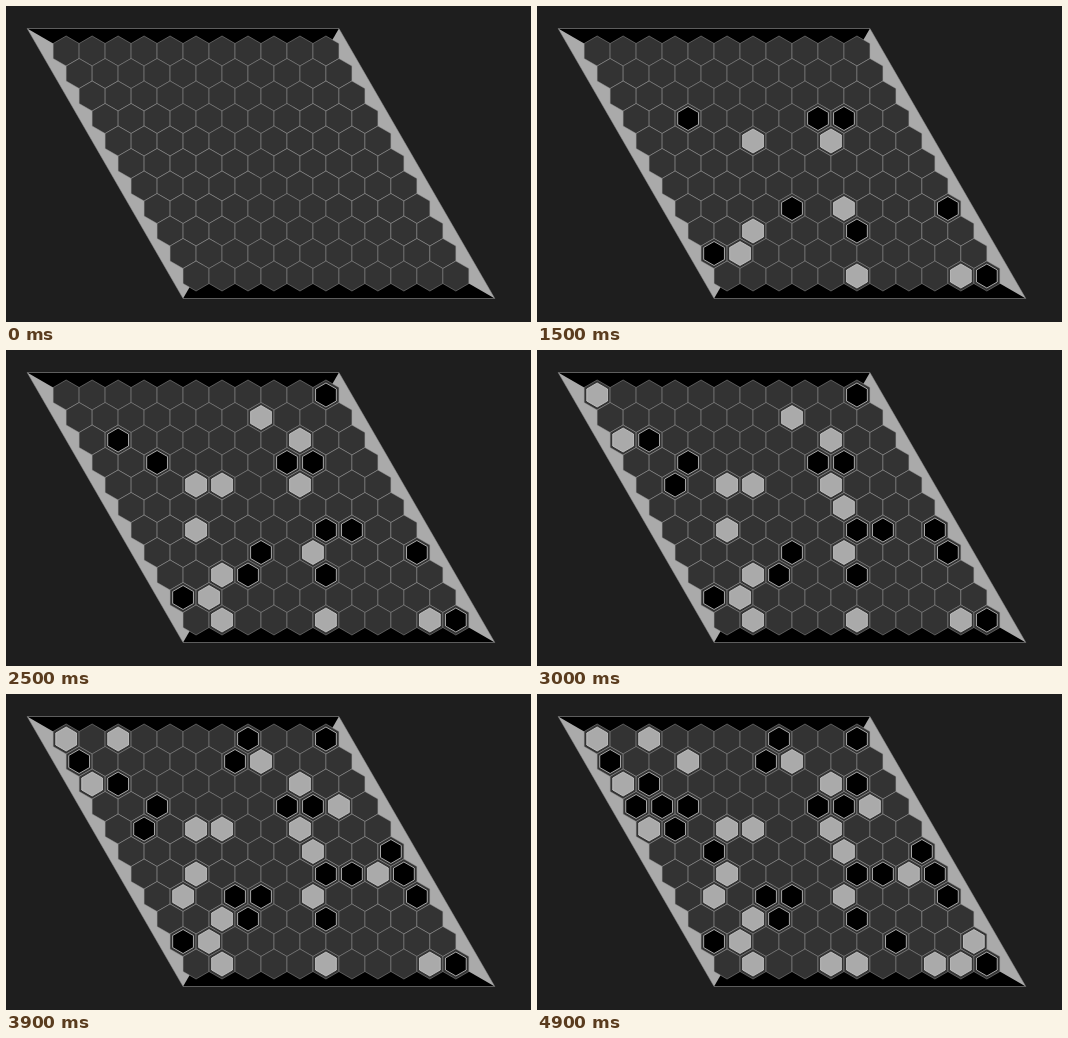
An HTML page with a canvas that plays this animation: 525 by 316 pixels, repeating every 5 s.

```html
<!DOCTYPE html>
<html lang="en">
<head>
<meta charset="utf-8">
<title>Hex game</title>
<style>
html, body { margin: 0; width: 100%; height: 100%; overflow: hidden; background: #1e1e1e; }
canvas { display: block; }
</style>
</head>
<body>
<canvas></canvas>
<script>
const W = 525, H = 316, R = 15, S3 = Math.sqrt(3);
const CX = 255, CY = 157.5, STEP = 100, LOOP = 5000;

// Column and row of each move in base 11; black starts.
const moves = (
  '73 74 47 44 68 9a 83 67 a7 28 aa 5a ' +
  '23 19 09 82 a0 34 76 26 38 71 86 1a ' +
  '12 02 14 00 a6 75 70 20 61 93 37 17 ' +
  '01 96 a5 8a 92 4a 03 31 13 04 79 a9 25'
).split(' ').map(m => [...m].map(d => parseInt(d, 11)));

const canvas = document.querySelector('canvas');
const g = canvas.getContext('2d');
const dpr = window.devicePixelRatio || 1;
canvas.width = W * dpr;
canvas.height = H * dpr;
canvas.style.width = W + 'px';
canvas.style.height = H + 'px';
g.scale(dpr, dpr);

function poly(points, fill, stroke, width) {
  g.beginPath();
  for (const [x, y] of points) g.lineTo(x, y);
  g.closePath();
  if (fill) {
    g.fillStyle = fill;
    g.fill();
  }
  if (stroke) {
    g.strokeStyle = stroke;
    g.lineWidth = width;
    g.stroke();
  }
}

function hex(c, r, radius, fill, stroke, width) {
  const x = CX + R * S3 * (c - 5 + (r - 5) / 2);
  const y = CY + R * 1.5 * (r - 5);
  const corners = Array.from({ length: 6 }, (_, i) => {
    const a = (i + 0.5) * Math.PI / 3;
    return [x + radius * Math.cos(a), y + radius * Math.sin(a)];
  });
  poly(corners, fill, stroke, width);
}

function board() {
  const h = 9 * R, mid = [CX, CY];
  const tl = [CX - h * S3, CY - h], tr = [CX + h / S3, CY - h];
  const br = [CX + h * S3, CY + h], bl = [CX - h / S3, CY + h];
  poly([tl, tr, br, bl], '#aaa');
  poly([tl, tr, mid], '#000');
  poly([bl, br, mid], '#000');
  poly([tl, tr, br, bl], null, '#888', 0.5);
  for (let r = 0; r < 11; r++)
    for (let c = 0; c < 11; c++) hex(c, r, R, '#333', '#999', 0.5);
}

function draw(now) {
  const count = Math.floor(now % LOOP / STEP);
  g.fillStyle = '#1e1e1e';
  g.fillRect(0, 0, W, H);
  board();
  moves.slice(0, count).forEach(([c, r], i) =>
    hex(c, r, 12, i % 2 ? '#aaa' : '#000', '#ccc', 0.8));
}

const start = performance.now();
function tick() {
  draw(performance.now() - start);
  requestAnimationFrame(tick);
}
tick();
</script>
</body>
</html>
```
